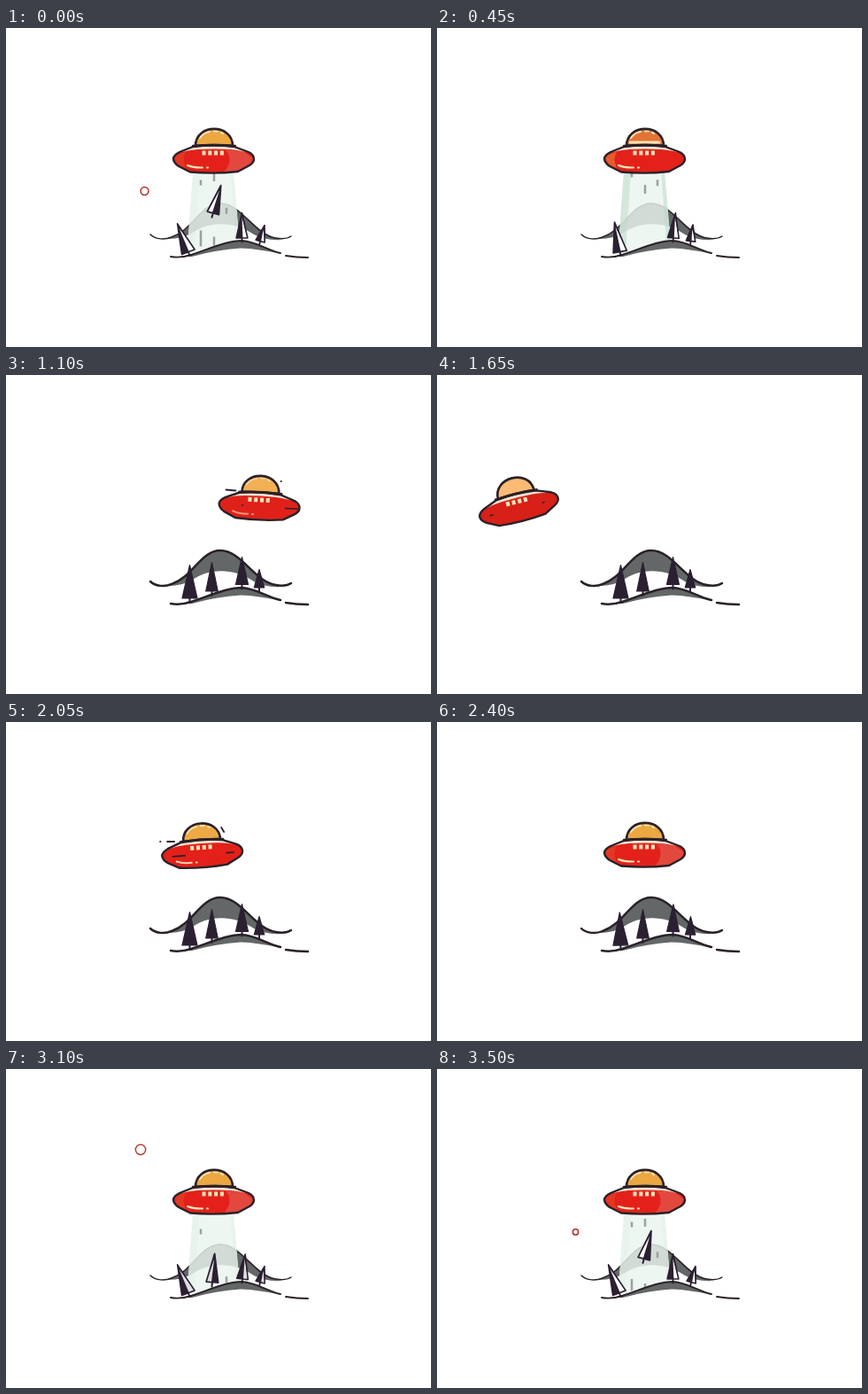
These frames come from a looping animation (480x360 px, 3.55 s). An HTML page with a canvas:

```html
<!DOCTYPE html>
<html lang="en">
<head>
<meta charset="utf-8">
<title>Saucer over the hills</title>
<style>
html, body { margin: 0; width: 100%; height: 100%; overflow: hidden; background: #fff; }
canvas { display: block; }
</style>
</head>
<body>
<canvas id="stage" width="480" height="360"></canvas>
<script>
const ctx = document.getElementById('stage').getContext('2d');
const LOOP = 3550;
const INK = '#2a2128', GREY = '#636767', TREE = '#2b2032', CREAM = '#fae3b8';

const shape = d => new Path2D(d);
const backLine = shape('M163 233C169 239 180 239 187 236C211 228 220 198 242 198C266 198 281 234 305 237Q316 239 322 235');
const backFill = shape('M178 238C211 232 220 198 242 198C266 198 281 234 312 239Q292 240 280 233C258 218 232 218 214 229Q200 239 178 238Z');
const underHill = shape('M190 239Q204 236 214 229C232 218 258 218 280 233L275 242L265 240Q246 242 205 256Z');
const frontLine = shape('M186 258Q197 260 209 256C233 248 250 240 267 240C282 241 294 250 310 254M316 257Q328 259 341 259');
const frontFill = shape('M200 258C233 249 250 240 267 240C282 241 294 250 310 255Q285 249 265 248.5Q238 250 210 258Z');
const body = shape('M189 147Q190 143 196 140L211 134Q235 131 258 134L274 140Q280 143 280 148Q280 152 275 155L262 162Q235 165 208 162.5L195 156Q189 152 189 147Z');
const rim = shape('M196 140.5L212 134.5Q235 132.5 257 134.5L274 140.5Q262 137.5 253 137Q235 136 217 137Q207 137.5 196 140.5Z');
const sidePanel = shape('M248 137L268 139L279 147L275 155L262 162L246 163Q258 149 248 137Z');
const leftPanel = shape('M190 148Q191 143 199 141L203 140Q198 148 203 158L195 155Z');
const dome = shape('M214 133C214 107.5 256 107.5 256 133Q235 131 214 133Z');

const ramp = (t, a, b) => {
  const u = Math.min(1, Math.max(0, (t - a) / (b - a)));
  return u * u * (3 - 2 * u);
};

function fill(path, color, alpha = 1) {
  ctx.globalAlpha = alpha;
  ctx.fillStyle = color;
  ctx.fill(path);
  ctx.globalAlpha = 1;
}

function stroke(path, color, width, alpha = 1) {
  ctx.globalAlpha = alpha;
  ctx.strokeStyle = color;
  ctx.lineWidth = width;
  ctx.stroke(path);
  ctx.globalAlpha = 1;
}

const line = (d, color, width, alpha) => stroke(shape(d), color, width, alpha);

function tree(x, y, half, height, angle, lit, scale = 1, side = 1) {
  if (scale <= 0) return;
  ctx.save();
  ctx.translate(x, y);
  ctx.rotate(angle * Math.PI / 180);
  ctx.scale(scale, scale);
  line('M0 0V-6', TREE, 2);
  const cone = shape(`M0 ${-height}L${half} -5H${-half}Z`);
  fill(cone, TREE);
  if (lit) fill(shape(`M0 ${6 - height}L${side * half} -5H${side}Z`), '#fff', lit);
  stroke(cone, TREE, 1.2 + .6 * lit);
  ctx.restore();
}

// Rising streaks: x, y at 3525 ms, length, speed
const streaks = [[220, 175, 6, .02], [235, 171, 9, .1], [249, 208, 7, .07], [220, 242, 18, .17], [235, 244, 10, .13]];

function beam(T) {
  const open = ramp(T, 2450, 3000) * (1 - ramp(T, 4050, 4350));
  if (open < .01) return;
  const top = 23 * open, low = 4 + 26 * open;
  ctx.save();
  ctx.lineCap = 'butt';
  fill(underHill, '#b0cdbb', ramp(T, 2500, 2700) * (1 - ramp(T, 2800, 3100)));
  const cone = shape(`M${234 - top} 161H${234 + top}L${234 + low} 241Q${234} 244 ${234 - low} 256Z`);
  ctx.clip(cone);
  fill(cone, '#ebf5ee', .82);
  const late = ramp(T, 3650, 3950);
  fill(shape('M205 160H219L213 256H200ZM253 160H260L268 256H260Z'), '#bcdac7', .12 + .4 * late);
  for (const [x, y0, length, speed] of streaks) {
    const y = y0 - speed * (T - 3525);
    if (y > 165 && y < 248) line(`M${x} ${y - length / 2}v${length}`, '#9da29c', 2.5);
  }
  ctx.restore();
}

function saucer(t, T) {
  let x = 0, y = 0, angle = 0;
  if (t > 850 && t < 1375) {
    const u = (t - 850) / 250;
    x = 51 * u ** 2.6;
    angle = Math.min(12, 3 * u);
  } else if (t >= 1375 && t < 2250) {
    const left = 2250 - t;
    x = -13 * (left / 200) ** 2.18;
    y = left / 400;
    angle = -14 * (left / 600) ** 1.15;
  }
  const moving = t > 950 && t < 2150;
  const speed = Math.min(1, Math.abs(x) / 140);
  const swallow = ramp(T, 3800, 3950) * (1 - ramp(T, 4150, 4350));

  ctx.save();
  ctx.translate(235 + x, 148 + y);
  ctx.rotate(angle * Math.PI / 180);
  ctx.translate(-235, -148);
  fill(dome, '#eba740');
  fill(dome, '#fbbb74', speed);
  fill(dome, '#df6330', swallow * .75);
  line('M219 124Q223 118 230 117M235 116.5h4M243 118l2 1', CREAM, 2.2, 1 - speed);
  line('M218 129H251', CREAM, 3, swallow);
  stroke(dome, INK, 2.6);
  fill(body, '#e3211a');
  fill(body, '#cf2018', speed * .6);
  fill(sidePanel, '#e2564a', moving ? 0 : .75 * (1 - swallow));
  fill(leftPanel, '#e66a35', moving ? 0 : .3 + .5 * swallow);
  fill(rim, '#f3e5d3');
  stroke(body, INK, 2.4);
  line('M211 133Q235 131 259 133', INK, 2.4);
  ctx.fillStyle = CREAM;
  for (let i = 0; i < 4; i++) ctx.fillRect(221.5 + i * 6.8, 138.5, 4, 5);
  line('M205 155Q212 158 222 157.5M227 157.5h1', CREAM, 2, 1 - speed);
  if (moving) {
    const mark = 15 * (1 - .8 * speed);
    line(t < 1375 ? 'M264 149H278M215 148h1' : `M201 149h${mark}M262 149h${mark * .6}`, INK, 1.6);
  }
  ctx.restore();

  if (moving && (t < 1300 || t > 1800)) {
    const trail = t < 1375 ? 'M197 129.5L208 130.5M259 120h.3' : 'M187 135h.3M195 135H203M256 119L259 124';
    ctx.save();
    ctx.translate(x, 0);
    line(trail, INK, 1.8);
    ctx.restore();
  }
}

function ring(x, y, T, start, color) {
  const age = T - start;
  if (age < 0 || age > 200) return;
  const circle = new Path2D();
  circle.arc(x, y, 1.9 + .025 * age, 0, 7);
  stroke(circle, color, 1.5, 1 - ramp(age, 140, 200));
}

function draw(t) {
  // The abduction runs across the loop seam
  const T = t < 1400 ? t + LOOP : t;
  ctx.fillStyle = '#fff';
  ctx.fillRect(0, 0, 480, 360);
  ctx.lineCap = ctx.lineJoin = 'round';

  const tilt = ramp(T, 2350, 2650) * (1 - ramp(T, 3750, 4250));
  const glow = ramp(T, 2350, 2650) * (1 - ramp(T, 4050, 4300));
  const lit = ramp(T, 2950, 3150) * (1 - ramp(T, 4050, 4300));
  const pull = ramp(T, 2900, 3400) * (1 - ramp(T, 3600, 3950));
  const squash = 1 - .09 * glow;

  fill(backFill, GREY);
  stroke(backLine, INK, 2.5 - glow);
  beam(T);
  fill(frontFill, GREY);
  stroke(frontLine, INK, 2.5 - .6 * glow);

  tree(207.5, 257, 8.5, 42.5, -21 * tilt, lit, squash);
  tree(266.5, 241.5, 7, 36, 10 * tilt * (1 - pull), lit, squash);
  tree(286, 245, 5.7, 25.5, 15 * tilt, lit, squash);

  const age = Math.max(0, T - 2900) / 600;
  const lift = 30 * age * age;
  if (T > 4200) tree(232.5, 249, 6.8, 37.5, 0, 0, ramp(T, 4250, 4600));
  else if (lift < 85) tree(232.5, 249 - lift, 6.8, 37.5, 14.5 * age, lit, 1 - ramp(lift, 62, 90) * .6, -1);

  saucer(t, T);
  ring(156.5, 184, T, 3450, '#b32a22');
  ring(152, 91, T, 2950, '#b32a22');
  if (T > 2660 && T < 2780) line('M316 166v3M320 166v4', '#b4c8ba', 1);
}

function tick() {
  draw(performance.now() % LOOP);
  requestAnimationFrame(tick);
}
tick();
</script>
</body>
</html>
```
